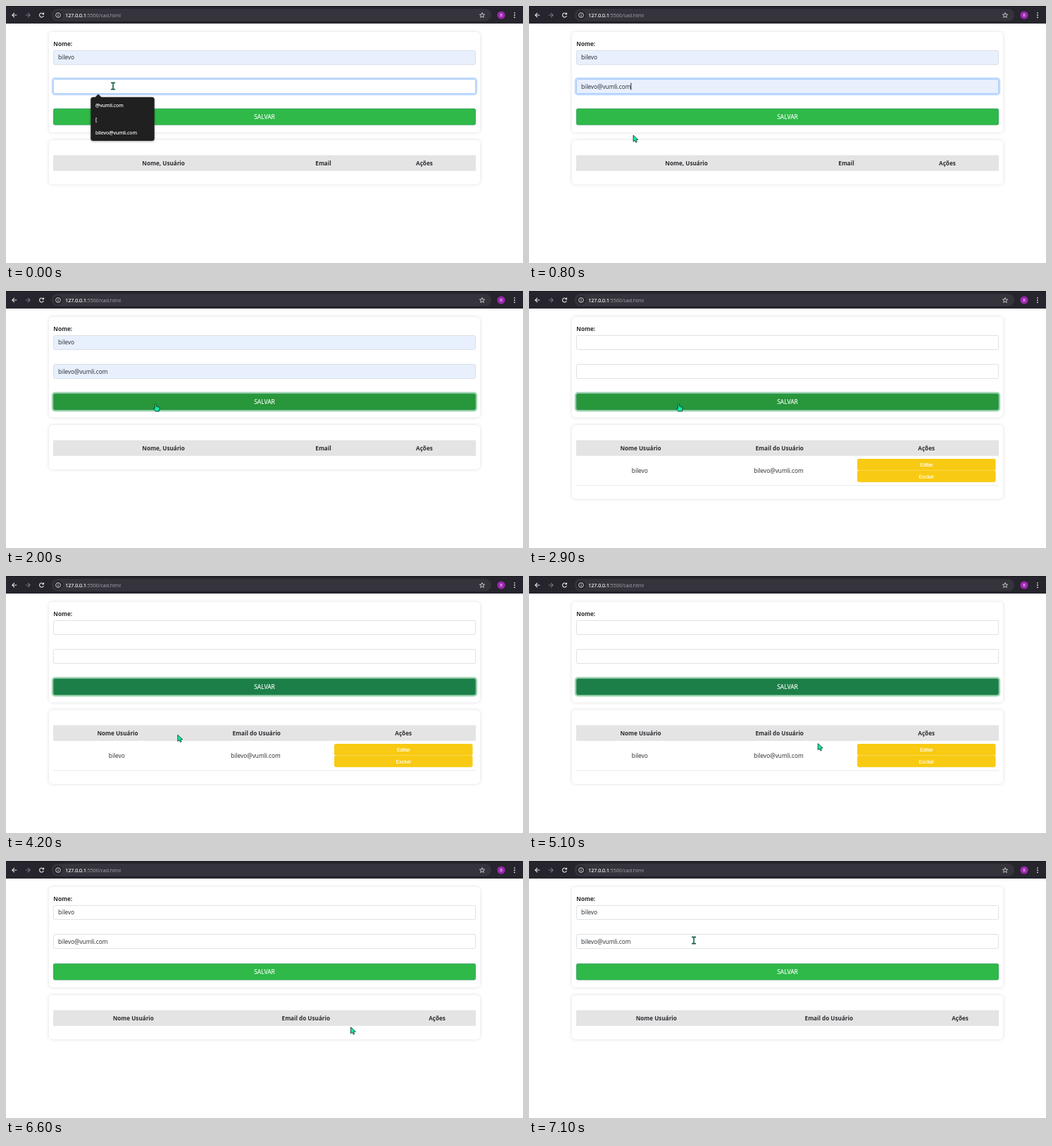
Animation, 734 px wide and 366 px high, one loop 8 s. Source, as an HTML page:

```html
<!DOCTYPE html>
<html lang="pt">
<head>
<meta charset="utf-8">
<title>Cadastro</title>
<style>
html, body { margin: 0; width: 100%; height: 100%; overflow: hidden; background: #fff; }
svg { display: block; width: 734px; height: 366px; }
text { font: 8.3px "Open Sans", "Noto Sans", sans-serif; fill: #212529; }
.bold { font-size: 8.15px; font-weight: 700; fill: #2b2d30; }
.mid { text-anchor: middle; }
.url { font-size: 7.02px; fill: #a9a8b0; }
.light { fill: #fff; stroke: #fff; stroke-width: .15; }
.tip { font-size: 6.95px; }
.small { font: 7.2px "Liberation Sans", Arial, sans-serif; }
.card { fill: #fff; filter: drop-shadow(0 0 2.5px rgba(0,0,0,.13)); }
.field { stroke: #ced4da; stroke-width: .7; }
.ring { fill: none; stroke-width: 2.15; }
.icon { fill: none; stroke: #e6e5ea; stroke-width: 1.1; }
.ink { fill: #14eaa6; stroke: #10302a; stroke-width: .8; stroke-linejoin: round; }
</style>
</head>
<body>
<svg viewBox="0 0 734 366">
  <rect width="734" height="25" fill="#1a191f"/>
  <path d="M0 25V3Q0 1 2 1H732Q734 1 734 3V25Z" fill="#26242c"/>
  <rect x="64.5" y="4" width="624.5" height="17.5" rx="8.7" fill="#35333c"/>
  <g class="icon">
    <path d="M15.3 13H9M12 9.8L8.8 13L12 16.2"/>
    <path d="M27.7 13H34M31 9.8L34.2 13L31 16.2" stroke="#77757e"/>
    <path d="M53 11.2A3 3 0 1 0 53.4 14M53.5 9.6V11.8H51.2"/>
    <circle cx="74" cy="13" r="6.3" fill="#26242c" stroke="none"/>
    <circle cx="74" cy="13" r="3.4" stroke-width=".9"/>
    <path d="M74 12.5V15M74 10.9V11.7" stroke-width=".9"/>
    <path d="M676 9.5L677 12L679.6 12.1L677.6 13.8L678.3 16.4L676 14.9L673.7 16.4L674.4 13.8L672.4 12.1L675 12Z" stroke-width=".8"/>
  </g>
  <text class="url" x="84.3" y="15.6"><tspan class="light">127.0.0.1</tspan>:5500/cad.html</text>
  <circle cx="703" cy="13" r="5.6" fill="#9c27b0"/>
  <text class="mid" x="703" y="15" style="font-size:5.5px;fill:#fff">B</text>
  <path d="M722 9.8V9.81M722 13V13.01M722 16.2V16.21" stroke="#e6e5ea" stroke-width="1.8" stroke-linecap="round"/>

  <rect class="card" x="61" y="37" width="612" height="143" rx="5"/>
  <rect class="card" id="list" x="61" y="191" width="612" rx="5"/>
  <text class="bold" x="67.3" y="57">Nome:</text>
  <rect class="field" id="nameBox" x="67.4" y="63.4" width="599.2" height="20" rx="2.2"/>
  <text id="name" x="74" y="76.4"></text>
  <rect class="ring" id="mailRing" x="65.9" y="102.9" width="602.2" height="23.2" rx="3.4" stroke="#c2dbfe"/>
  <rect class="field" id="mailBox" x="67.4" y="104.4" width="599.2" height="20.2" rx="2.2"/>
  <text id="mail" x="74" y="117.6"></text>
  <path id="caret" d="M.4 109.5V119.5" stroke="#111" stroke-width=".9"/>
  <rect class="ring" id="saveRing" x="65.9" y="144.9" width="602.2" height="25.7" rx="3.4" stroke="#a3d6b2"/>
  <rect id="save" x="67.3" y="146.3" width="599.4" height="23" rx="2.2" stroke="#198754" stroke-width=".55"/>
  <text class="mid light" x="367" y="160.9" style="font-size:8.5px">SALVAR</text>

  <rect x="67" y="212.5" width="600" height="22.3" fill="#e4e4e5"/>
  <g id="heads">
    <text class="bold mid" y="226.9"></text>
    <text class="bold mid" y="226.9"></text>
    <text class="bold mid" y="226.9">Ações</text>
  </g>
  <g id="row">
    <text class="mid" x="157.3" y="258.8">bilevo</text>
    <text class="mid" x="354.5" y="258.8">bilevo@vumli.com</text>
    <rect id="edit" x="466" y="239" width="196.5" height="16.6" rx="2.4"/>
    <rect x="466" y="255.6" width="196.5" height="16.6" rx="2.4" fill="#f9ca13"/>
    <text class="small mid light" x="564.3" y="250.1">Editar</text>
    <text class="small mid light" x="564.3" y="266.9">Excluir</text>
    <path d="M67 277H667" stroke="#dee2e6" stroke-width=".8"/>
  </g>

  <g id="menu" style="filter:drop-shadow(0 1px 1.5px rgba(0,0,0,.35))">
    <path d="M126 130.5L131 125.5L136 130.5Z" fill="#1f201f"/>
    <rect x="120.3" y="129.7" width="90.4" height="62.3" rx="3.5" fill="#1f201f"/>
    <rect id="pick" x="120.3" width="90.4" height="19.4" fill="#3b3c3b"/>
    <text class="tip light" x="127" y="144.2">@vumli.com</text>
    <text class="tip light" x="127" y="163.7">[</text>
    <text class="tip light" x="127" y="183">bilevo@vumli.com</text>
  </g>

  <g id="cursor">
    <path class="ink" id="arrow" d="M0 0V9.2L2.2 7.4L3.7 10.4L5.3 9.6L3.9 6.7L6.9 6.4Z"/>
    <path id="beam" d="M-3 -4.6H3M0 -4.6V4.6M-3 4.6H3" fill="none" stroke="#14604a" stroke-width="1.6"/>
    <path class="ink" id="hand" d="M-1.1 .6Q0 -.6 1.1 .6V4L4.6 4.8Q5.8 5.2 5.6 6.6L4.9 10.8H-.4L-3.2 7.2Q-3 5.8 -1.1 6.8Z"/>
  </g>
</svg>
<script>
const LOOP = 8000, TICK = 100;
const USER = "bilevo", MAIL = "bilevo@vumli.com";
const MENU_END = 800, PRESS = 2000, SAVED = 2200, EDIT_PRESS = 6000, EDITED = 6200;
const $ = id => document.getElementById(id);
const show = (id, on) => { $(id).style.display = on ? "" : "none"; };
const set = (id, key, value) => $(id).setAttribute(key, value);

// Each pointer move eases from where the last one ended; bend bows it vertically.
const moves = [
  { from: 0, to: 500, x: 148, y: 184 },
  { from: 900, to: 1400, x: 212, y: 132 },
  { from: 1500, to: 1600, x: 217.5, y: 146 },
  { from: 1800, to: 2000, x: 212.5, y: 160.5 },
  { from: 2900, to: 3700, x: 153, y: 243 },
  { from: 3700, to: 4600, x: 366, y: 238, bend: -15 },
  { from: 4600, to: 5300, x: 438, y: 239 },
  { from: 5400, to: 5900, x: 510, y: 246.5 },
  { from: 6500, to: 7100, x: 234, y: 113 }
];

function pointer(t) {
  let x = 152, y = 114;
  for (const m of moves) {
    const u = Math.min(1, Math.max(0, (t - m.from) / (m.to - m.from))) ** 1.45;
    x += (m.x - x) * u;
    y += (m.y - y) * u + (m.bend || 0) * Math.sin(Math.PI * u);
  }
  return [x, y];
}

// Columns share the table in proportion to their content, as in automatic table layout.
function layoutHeads(named, hasRow) {
  const cells = [...$("heads").children];
  cells[0].textContent = named ? "Nome Usuário" : "Nome, Usuário";
  cells[1].textContent = named ? "Email do Usuário" : "Email";
  const widths = cells.map(c => c.getComputedTextLength() + 8.6);
  if (hasRow) widths[2] = 75;
  const scale = 600 / widths.reduce((a, b) => a + b);
  let x = 67;
  cells.forEach((c, i) => {
    const w = widths[i] * scale;
    c.setAttribute("x", x + w / 2);
    x += w;
  });
}

function draw(t) {
  const [x, y] = pointer(t);
  const menu = t < MENU_END, saved = t >= SAVED && t < EDITED;
  const mailFocus = t < PRESS, saveFocus = t >= PRESS && t < EDIT_PRESS;

  const pick = menu && y >= 132 ? Math.floor((y - 132) / 19.4) : -1;
  show("menu", menu);
  show("pick", pick >= 0);
  set("pick", "y", 131.5 + Math.max(pick, 0) * 19.4);

  const mail = menu ? ["@vumli.com", "[", MAIL][pick] || "" : saved ? "" : MAIL;
  $("name").textContent = saved ? "" : USER;
  $("mail").textContent = mail;
  set("nameBox", "fill", t < SAVED ? "#e8f0fe" : "#fff");
  set("mailBox", "fill", t < SAVED && mail ? "#e8f0fe" : "#fff");
  $("mailBox").style.stroke = mailFocus ? "#86b7fe" : "";
  show("mailRing", mailFocus);
  const blinkOff = (t - MENU_END) % 800 >= 500;
  show("caret", !menu && mailFocus && !blinkOff);
  set("caret", "transform", `translate(${74 + $("mail").getComputedTextLength()} 0)`);

  const inForm = x > 67 && x < 667;
  const onSave = !menu && inForm && y > 147 && y < 169.5;
  const onEdit = saved && x > 466 && x < 662 && y > 239 && y < 255;
  set("save", "fill", onSave ? "#28963a" : saveFocus ? "#1c7f47" : "#2fb948");
  show("saveRing", saveFocus);

  show("row", saved);
  set("edit", "fill", onEdit ? "#0d98ee" : "#f9ca13");
  set("list", "height", saved ? 105 : 63);
  layoutHeads(t >= SAVED, saved);

  const beam = inForm && y > 104 && y < 125, hand = onSave || onEdit;
  show("beam", beam);
  show("hand", hand);
  show("arrow", !beam && !hand);
  set("cursor", "transform", `translate(${x} ${y})`);
}

let last = -1;
function loop() {
  const t = Math.floor(performance.now() % LOOP / TICK) * TICK;
  if (t !== last) draw(last = t);
  requestAnimationFrame(loop);
}
loop();
</script>
</body>
</html>
```
